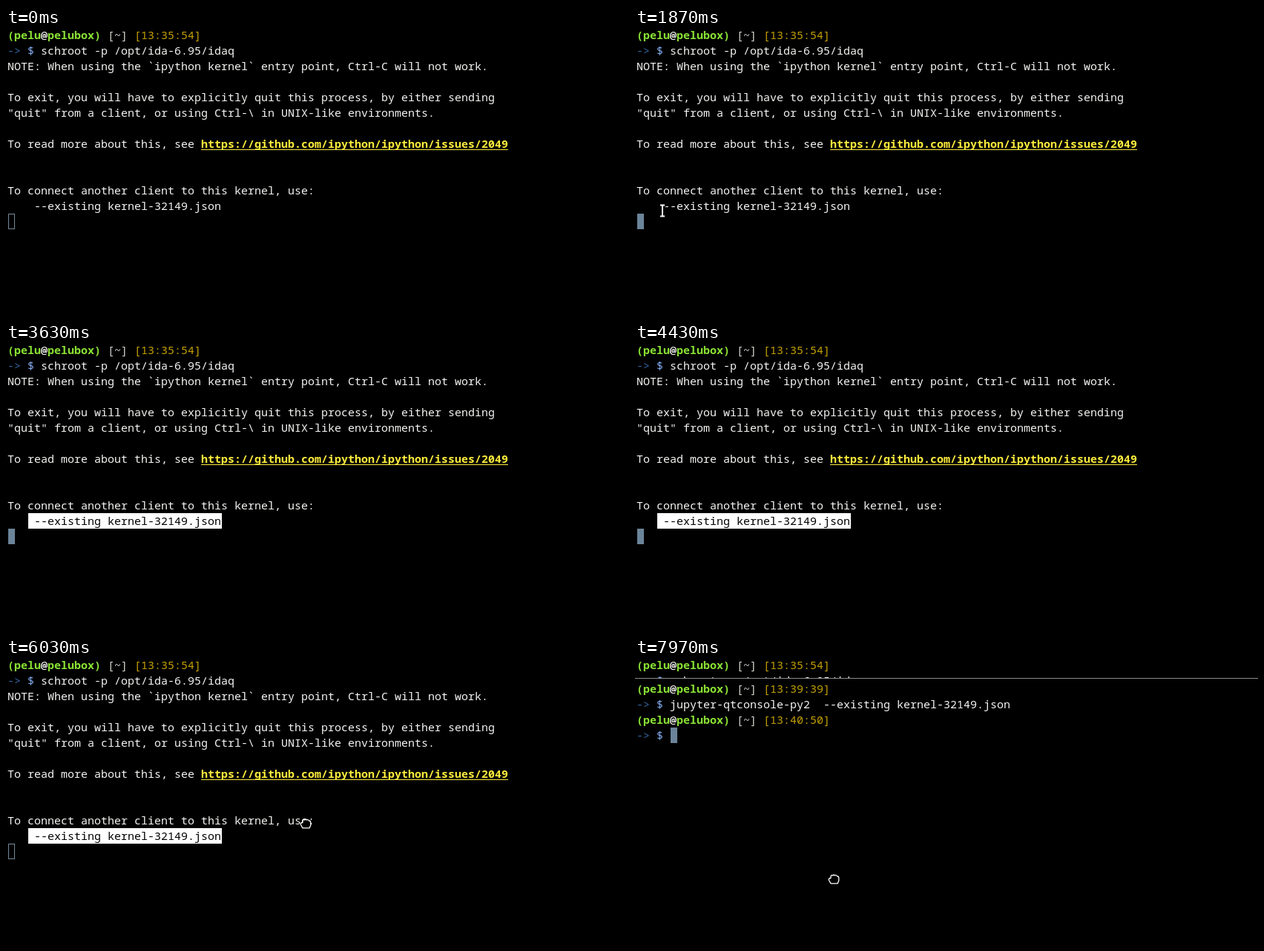
An HTML page that plays this animation: 840 by 388 pixels, repeating every 8000 ms.

```html
<!DOCTYPE html>
<html lang="en">
<head>
<meta charset="utf-8">
<title>Terminal</title>
<style>
  html, body { margin: 0; width: 100%; height: 100%; overflow: hidden; background: #000; }
  .stage { position: relative; width: 840px; height: 388px; overflow: hidden; background: #000; }
  .stage * { box-sizing: border-box; }
  pre, .selection {
    position: absolute; left: 2px; margin: 0; white-space: pre; color: #f4f4f2;
    font: 15px/21px "Noto Sans Mono", monospace; font-variant-ligatures: none;
  }
  .shell { top: -1px; }
  b { color: #8ae234; font-weight: 600; }
  b i { color: #eeeeec; font-style: normal; }
  .dir { color: #d3d7cf; }
  .time { color: #c4a000; }
  .arrow { color: #3465a4; }
  .dollar { color: #86b0f4; }
  .link {
    color: #fcec3c; font-weight: 600; text-decoration: underline 1px;
    text-underline-offset: 2px; text-decoration-skip-ink: none;
  }

  .caret { position: absolute; width: 9px; height: 21px; background: #6b8499; }
  .selection, .front, .pointer, .shell-caret { animation: 8s linear infinite; }
  .shell-caret { left: 3px; top: 251px; animation-name: focus; animation-timing-function: step-end; }
  .selection {
    left: 30px; top: 230px; width: 0; height: 21px; overflow: hidden;
    background: #fff; color: #000; text-indent: -1px; animation-name: select;
  }
  .front {
    position: absolute; left: 0; top: 0; width: 840px; height: 400px;
    animation-name: raise;
  }
  .front::before {
    content: ""; position: absolute; inset: 0 -10px;
    background: #000; border-top: 1px solid #8c8c8c;
  }
  .front pre { top: 4px; }
  .front .caret { left: 48px; top: 67px; }

  .pointer { position: absolute; left: -10px; top: -10px; width: 20px; height: 20px; overflow: visible; }
  .beam { animation-name: beam; }
  .hand { animation-name: hand; }

  @keyframes focus {
    0%, 58.75% { background: #000; border: 1px solid #76899a; }
    14% { background: #6b8499; border: 0 solid #6b8499; }
  }
  @keyframes select {
    0% { width: 0; }
    25% { width: 0; animation-timing-function: steps(28); }
    34.5% { width: 252px; animation-timing-function: step-end; }
    35.6%, 100% { width: 261px; }
  }
  @keyframes beam {
    0%, 12.5% { transform: translate(-12px, 252px); animation-timing-function: ease-out; }
    18.5%, 23.5% { transform: translate(37px, 247px); }
    25% { transform: translate(33px, 241px); }
    34.5% { transform: translate(285px, 240px); }
    36%, 42% { transform: translate(292px, 241px); }
    42.01%, 100% { transform: translate(-30px, 241px); }
  }
  @keyframes hand {
    0%, 57.5% { transform: translate(300px, 410px); }
    57.51% { transform: translate(300px, 245px); }
    62.5% { transform: translate(330px, 331px); }
    65% { transform: translate(345px, 410px); }
    73% { transform: translate(385px, 410px); animation-timing-function: ease-out; }
    75.2%, 76.5% { transform: translate(404px, 224px); }
    83% { transform: translate(400px, 410px); }
    94% { transform: translate(262px, 410px); animation-timing-function: ease-out; }
    96.5%, 97.2% { transform: translate(266px, 307px); }
    99%, 100% { transform: translate(268px, 299px); }
  }
  @keyframes raise {
    0%, 83.75% { transform: translate(0, 390px); animation-timing-function: ease-out; }
    90.6%, 97.2% { transform: translate(-2px, 35px); }
    99%, 100% { transform: translate(0, 27px); }
  }
</style>
</head>
<body>
<div class="stage">
<pre class="shell"><b>(pelu<i>@</i>pelubox)</b> <span class="dir">[~]</span> <span class="time">[13:35:54]</span>
<span class="arrow">-&gt;</span> <span class="dollar">$</span> schroot -p /opt/ida-6.95/idaq
NOTE: When using the `ipython kernel` entry point, Ctrl-C will not work.

To exit, you will have to explicitly quit this process, by either sending
"quit" from a client, or using Ctrl-\ in UNIX-like environments.

To read more about this, see <span class="link">https://github.com/ipython/ipython/issues/2049</span>


To connect another client to this kernel, use:
    --existing kernel-32149.json</pre>
  <div class="selection"> --existing kernel-32149.json</div>
  <div class="caret shell-caret"></div>

  <div class="front">
<pre><b>(pelu<i>@</i>pelubox)</b> <span class="dir">[~]</span> <span class="time">[13:39:39]</span>
<span class="arrow">-&gt;</span> <span class="dollar">$</span> jupyter-qtconsole-py2  --existing kernel-32149.json
<b>(pelu<i>@</i>pelubox)</b> <span class="dir">[~]</span> <span class="time">[13:40:50]</span>
<span class="arrow">-&gt;</span> <span class="dollar">$</span></pre>
    <div class="caret"></div>
  </div>

  <svg class="pointer beam" viewBox="-10 -10 20 20" fill="none">
    <path d="M-3 -7.5H3M0 -7.5V7.5M-3 7.5H3" stroke="#000" stroke-width="4" stroke-linecap="square"/>
    <path d="M-3 -7.5H3M0 -7.5V7.5M-3 7.5H3" stroke="#fff" stroke-width="2"/>
  </svg>
  <svg class="pointer hand" viewBox="-10 -10 20 20">
    <path d="M-4 -3.5Q-3.5 -6 -1.5 -5Q0 -6.5 1.5 -5Q3.5 -6 4.5 -4Q7 -4 6.8 -1V2L5.2 5.8H-4L-6.5 1.5Q-7.5 -1.5 -4 -1.5Z"
      fill="#000" stroke="#fff" stroke-width="1.3" stroke-linejoin="round"/>
  </svg>
</div>
</body>
</html>
```
